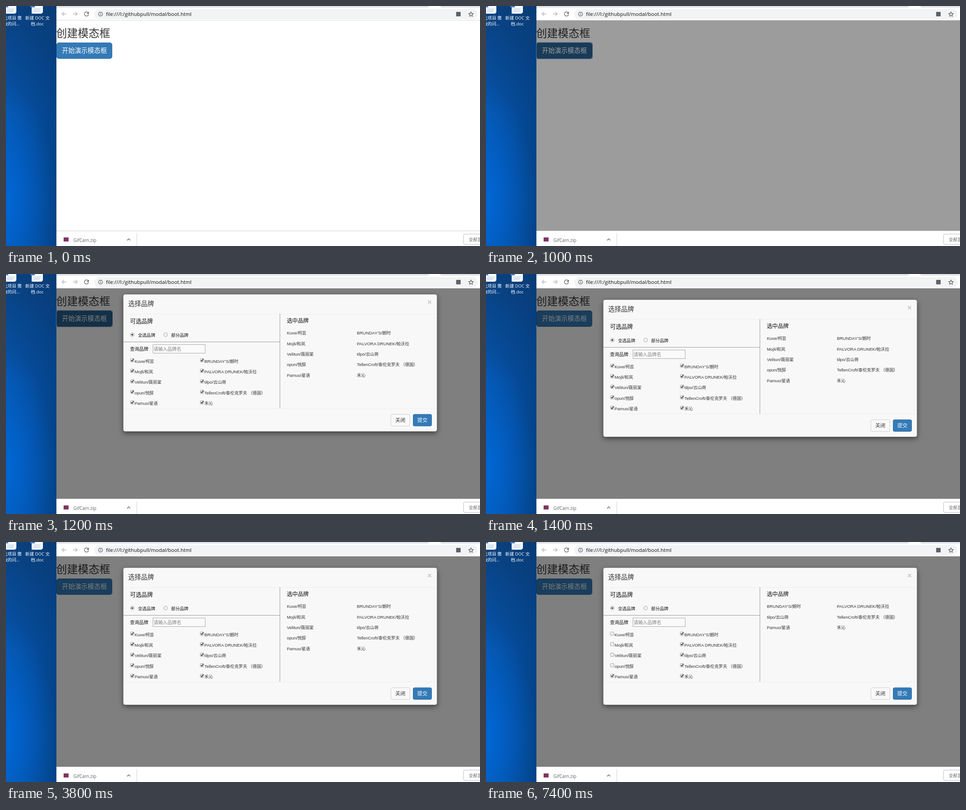
These frames come from a looping animation (1053x532 px, 8 s). An HTML page:

```html
<!DOCTYPE html>
<html lang="zh-CN">
<head>
<meta charset="utf-8">
<title>创建模态框</title>
<style>
  html, body { margin: 0; width: 100%; height: 100%; overflow: hidden; background: #fff; }
  svg { display: block; width: 1053px; height: 532px; }
  text { font-family: "Open Sans", "Noto Sans CJK SC", "Noto Sans CJK", sans-serif; fill: #333; white-space: pre; }
  .mid { text-anchor: middle; }
  .white { fill: #fff; }
  .dark { fill: #111; }
  .small { font-size: 9.6px; }
  .brand { font: 9.45px "Liberation Sans", "Noto Sans CJK SC", "Noto Sans CJK", sans-serif; }
  .icon { fill: none; stroke: #5f6368; stroke-width: 1.3; }
  .pale { stroke: #b4b6b9; }
  .primary { fill: #337ab7; stroke: #2e6da4; }
  .box { fill: #f1f1f1; stroke: #a3a3a3; }
  .tick { fill: none; stroke: #333; stroke-width: 1.7; }

  #open, #ring, #backdrop, #modal { animation: 8s step-end infinite; }
  #open { animation-name: press; }
  #ring { animation-name: focus; }
  #backdrop { animation-name: dim; }
  #modal { animation-name: drop; }
  #panel { filter: drop-shadow(0 4px 6px rgba(0, 0, 0, .5)); }

  @keyframes press {
    0%, 17.5% { fill: #337ab7; stroke: #2e6da4; }
    8.75% { fill: #286090; stroke: #204d74; }
    100% { fill: #337ab7; stroke: #2e6da4; }
  }
  @keyframes focus {
    0%, 17.5%, 100% { opacity: 0; }
    11.25% { opacity: 1; }
  }
  @keyframes dim {
    0% { opacity: 0; }
    12.5% { opacity: .39; }
    13.75%, 100% { opacity: .5; }
  }
  @keyframes drop {
    0% { opacity: 0; transform: translateY(-76px); }
    13.75% { opacity: .65; transform: translateY(-40px); }
    15% { opacity: 1; transform: translateY(-12px); }
    16.25%, 100% { opacity: 1; transform: none; }
  }
</style>
</head>
<body>
<svg viewBox="0 0 1053 532">
  <defs>
    <linearGradient id="sky" x2="1" y2="0">
      <stop stop-color="#0655ad"/><stop offset="1" stop-color="#04438a"/>
    </linearGradient>
    <linearGradient id="dusk" x2="0" y2="1">
      <stop stop-color="#0b3a70" stop-opacity=".75"/><stop offset=".45" stop-color="#0b3a70" stop-opacity="0"/>
    </linearGradient>
    <radialGradient id="glow" gradientUnits="userSpaceOnUse" cx="0" cy="0" r="1" gradientTransform="translate(-10 430) scale(120 260)">
      <stop stop-color="#0068d8"/><stop offset="1" stop-color="#0068d8" stop-opacity="0"/>
    </radialGradient>
    <clipPath id="page"><rect x="112" y="32" width="941" height="467"/></clipPath>
    <g id="doc">
      <path d="M0 0H25V14l-3 3H0z" fill="#f7f9fc"/>
      <path d="M4 6.5H20M4 9.5H20M4 12.5H17" stroke="#a9c4e6"/>
      <rect x="-3" y="-6" width="10" height="9" fill="#3f7fd0"/>
    </g>
  </defs>

  <!-- desktop -->
  <rect width="112" height="532" fill="url(#sky)"/>
  <rect width="112" height="532" fill="url(#dusk)"/>
  <rect width="112" height="532" fill="url(#glow)"/>
  <use href="#doc" x="-2"/>
  <use href="#doc" x="57"/>
  <g class="small">
    <text class="white" x="-6" y="30">此项目 需</text>
    <text class="white" x="-6" y="43">改的问...</text>
    <text class="white mid" x="70" y="30">新建 DOC 文</text>
    <text class="white mid" x="69.5" y="43">档.doc</text>
  </g>

  <!-- browser toolbar -->
  <rect x="112" width="941" height="532" fill="#fff"/>
  <path d="M112 0H940q-1 3.500-5 3.500H112zM964 0H1053V3.500H969q-4 0-5-3.500z" fill="#dee1e6"/>
  <path d="M112 31.500H1053" stroke="#d6d7d9"/>
  <rect x="196" y="7" width="851" height="22" rx="11" fill="#f1f3f4"/>
  <path class="icon pale" d="M134 17.500H124.500M129 13l-4.500 4.500 4.500 4.500M149 17.500H158.500M154 13l4.500 4.500-4.500 4.500"/>
  <path class="icon" d="M182.500 14.500a4.700 4.700 0 1 0 1 4.500"/>
  <path d="M184 12.500v5h-5z" fill="#5f6368"/>
  <circle class="icon" cx="210" cy="18" r="4.400"/>
  <path class="icon" d="M210 17.500v3M210 15v1.200"/>
  <text class="dark" x="222" y="22" font-size="11.400">file:///I:/githubpull/modal/boot.html</text>
  <rect x="1000" y="13" width="10" height="10" rx="1" fill="#5f6368"/>
  <path class="icon" stroke-linejoin="round" d="M1033 13l1.500 3.500 3.800.300-2.900 2.500.900 3.700-3.300-2-3.300 2 .900-3.700-2.900-2.500 3.800-.300z"/>

  <!-- page -->
  <text x="111.500" y="69" font-size="24">创建模态框</text>
  <rect id="open" class="primary" x="112.500" y="81.500" width="123" height="35" rx="4.500"/>
  <rect id="ring" x="112" y="81" width="124.500" height="36" rx="2" fill="none" stroke="#6c9fe0"/>
  <text class="white" x="124.200" y="103.700" font-size="14.300">开始演示模态框</text>

  <g clip-path="url(#page)">
    <rect id="backdrop" x="112" y="32" width="941" height="467"/>
    <g id="modal">
      <rect id="panel" x="260.500" y="57" width="697" height="304" rx="4.500" fill="#f8f8f8" stroke="#000" stroke-opacity=".2"/>
      <text x="271.500" y="82.500" font-size="14.300">选择品牌</text>
      <text class="mid" x="941" y="79.500" style="font:bold 16.800px 'Liberation Sans',sans-serif;fill:#c6c6c6">×</text>
      <path d="M261 100.500H957M261 310.500H957" stroke="#efefef"/>
      <path d="M608.500 100V310M261 162.500H608" stroke="#999"/>
      <text class="dark" x="275.500" y="120.700" font-size="12.700">可选品牌</text>
      <text class="dark" x="624" y="120.200" font-size="12.100">选中品牌</text>
      <circle class="box" cx="280.500" cy="146.500" r="4.300"/>
      <circle class="box" cx="354.500" cy="146.500" r="4.300"/>
      <circle id="dot" cx="280.500" cy="146.500" r="2.100" fill="#444"/>
      <text class="dark small" x="293.200" y="151.400">全选品牌</text>
      <text class="dark small" x="366.800" y="151.400">部分品牌</text>
      <text class="dark" x="275.500" y="182.300" font-size="10.200">查询品牌</text>
      <rect x="326.500" y="168.500" width="116" height="19" fill="#fafafa" stroke="#a9a9a9"/>
      <text x="328" y="182.300" font-size="10.200" style="fill:#808080">请输入品牌名</text>
      <g id="options"></g>
      <g id="chosen"></g>
      <rect x="855" y="323" width="42" height="26" rx="3" fill="#f9f9f9" stroke="#ccc"/>
      <text class="mid" x="876" y="339.800" font-size="11.200">关闭</text>
      <rect class="primary" x="904.500" y="323" width="41" height="26" rx="3"/>
      <text class="mid white" x="925" y="339.800" font-size="11.200">提交</text>
    </g>
  </g>

  <!-- download bar -->
  <path d="M112 498.500H1053M290.500 504V532" stroke="#d0d1d3"/>
  <rect x="128" y="513" width="11" height="9" fill="#7d3561"/>
  <text x="149.500" y="523" font-size="10.200" style="fill:#5f6368">GifCam.zip</text>
  <path class="icon" d="M269 519.500l3.500-3.500 3.500 3.500"/>
  <rect x="1016.500" y="505.500" width="60" height="23" rx="3" fill="#fff" stroke="#b9bbbe"/>
  <text class="small" x="1028" y="520.700" style="fill:#5f6368">全部显示</text>
</svg>
<script>
  const LOOP = 8000, ROW = 23.35;
  const brands = [
    "Kuve/柯芸", "BRUNDAY’S/朗时", "Mojli/和岚", "PALVORA DRUNEK/帕沃拉", "Velitun/薇丽棠",
    "tilpo/云山荷", "opun/悦醇", "TellenCroft/泰伦克罗夫 （德国）", "Pamuo/星语", "禾沁"
  ];
  // Unchecked brand indices from each moment on.
  const everything = brands.map((_, i) => i);
  const states = [
    { at: 0, off: [] },
    { at: 2600, off: everything, partial: true },
    { at: 3500, off: [] },
    { at: 5400, off: [0] },
    { at: 6200, off: [0, 2] },
    { at: 6800, off: [0, 2, 4] },
    { at: 7400, off: [0, 2, 4, 6] }
  ];
  const byId = id => document.getElementById(id);
  const rowOf = i => Math.floor(i / 2) * ROW;
  const label = (name, x, y) => `<text class="brand" x="${x}" y="${y}">${name}</text>`;

  byId("options").innerHTML = brands.map((name, i) => {
    const x = i % 2 ? 431.5 : 276.5, y = 199.5 + rowOf(i);
    return `<rect class="box" x="${x}" y="${y}" width="7.5" height="7.5" rx="1"/>
      <path class="tick" d="M${x + 1.5} ${y + 3.5}l2 2.200 3.500-5"/>` + label(name, x + 9.3, y + 9);
  }).join("");
  const ticks = document.querySelectorAll(".tick");

  function show(state) {
    const selected = brands.filter((_, i) => !state.off.includes(i));
    ticks.forEach((tick, i) => tick.style.display = state.off.includes(i) ? "none" : "");
    byId("dot").setAttribute("cx", state.partial ? 354.5 : 280.5);
    byId("chosen").innerHTML = selected
      .map((name, i) => label(name, i % 2 ? 779.5 : 624, 146.4 + rowOf(i))).join("");
  }

  let start, current;
  function frame(now) {
    start ??= now;
    const time = (now - start) % LOOP;
    const state = states.findLast(s => s.at <= time);
    if (state !== current) show(current = state);
    requestAnimationFrame(frame);
  }
  show(current = states[0]);
  requestAnimationFrame(frame);
</script>
</body>
</html>
```
